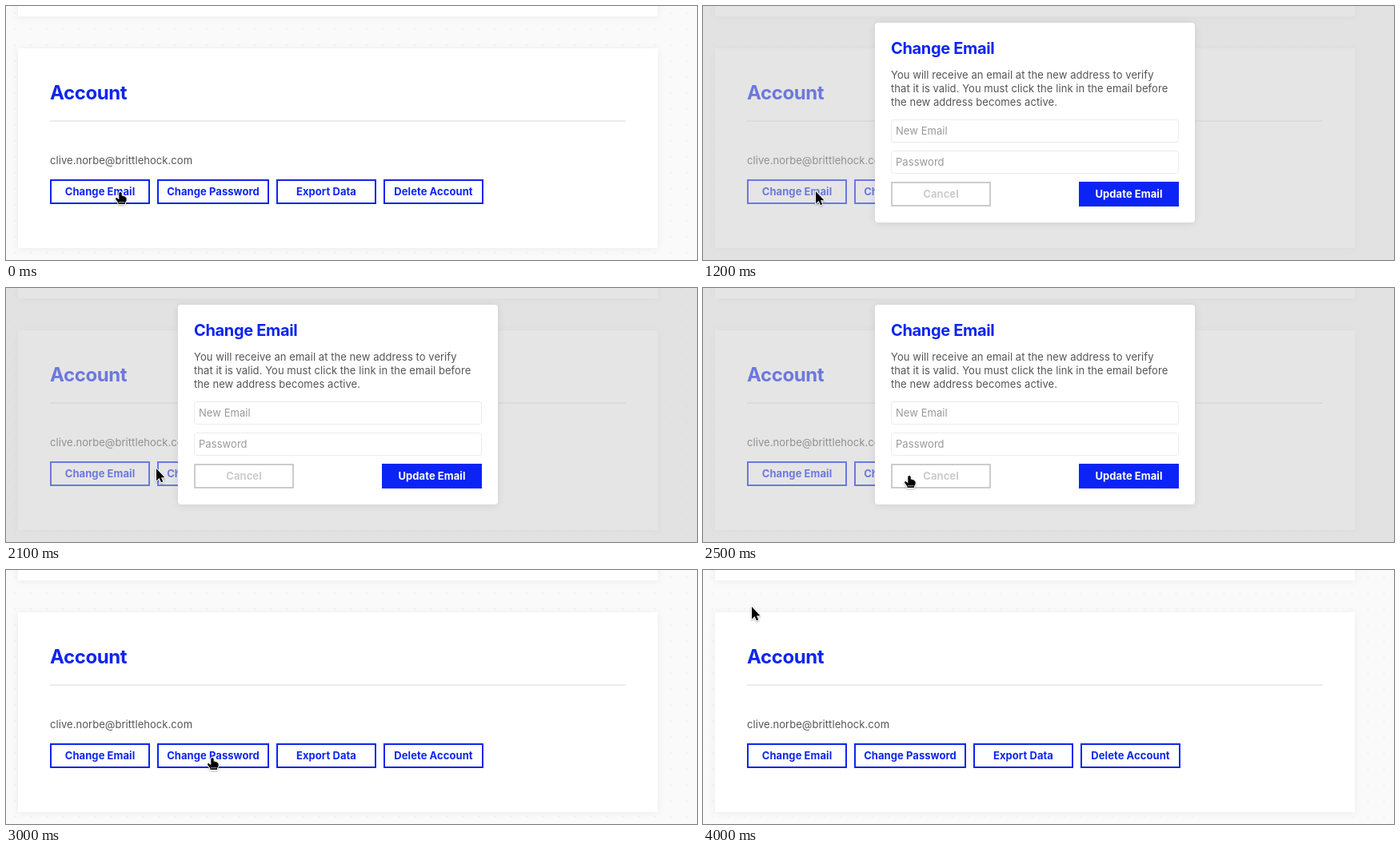
Animation, 864 px wide and 318 px high, one loop 4.1 s. Source, as an HTML page:

```html
<!DOCTYPE html>
<html lang="en">
<head>
<meta charset="utf-8">
<title>Account settings</title>
<style>
  html, body { margin: 0; width: 100%; height: 100%; overflow: hidden; background: #fafafa; }
  svg { display: block; width: 864px; height: 318px; }
  text { font: 400 13px Inter, "Liberation Sans", sans-serif; font-optical-sizing: none; letter-spacing: .06px; fill: #555; }
  .bold { font-weight: 700; text-anchor: middle; }
  .blue { fill: #0d25f0; }
  .title { font-weight: 700; }
  .h1 { font-size: 24px; letter-spacing: -.4px; }
  .h2 { font-size: 20px; letter-spacing: -.34px; }
  .hint { fill: #999; }
  .card { fill: #fff; filter: drop-shadow(0 1px 5px rgba(0, 0, 0, .06)); }
  .box { fill: #fff; filter: drop-shadow(0 1px 5px rgba(0, 0, 0, .09)); }
  .field { fill: #fff; stroke: #ebebeb; }
  .cursor { filter: drop-shadow(0 1px 1px rgba(0, 0, 0, .3)); }
  .cursor path { fill: #000; stroke: #fff; stroke-width: 2; stroke-linejoin: round; paint-order: stroke; }
  .cursor .cuff { fill: none; stroke-width: .7; }
  #modal { visibility: hidden; }
</style>
</head>
<body>
<svg viewBox="0 0 864 318">
  <defs>
    <pattern id="dots" width="20" height="20" patternUnits="userSpaceOnUse">
      <circle cx="11.5" cy="9" r="1" fill="#f0f0f0"/>
    </pattern>
  </defs>
  <rect width="864" height="318" fill="#fafafa"/>
  <rect width="864" height="318" fill="url(#dots)"/>
  <rect class="card" x="15" y="-40" width="800" height="53"/>
  <rect class="card" x="15" y="53" width="800" height="250"/>
  <text class="title blue h1" x="55" y="117">Account</text>
  <rect x="55" y="143" width="720" height="2" fill="#ececec"/>
  <text x="55" y="198">clive.norbe@brittlehock.com</text>
  <g id="buttons"></g>

  <g id="modal">
    <rect width="864" height="318" fill="#ccc" fill-opacity=".5"/>
    <rect class="box" x="215" y="21" width="400" height="250" rx="4"/>
    <text class="title blue h2" x="235" y="60">Change Email</text>
    <text x="235" y="91">You will receive an email at the new address to verify</text>
    <text x="235" y="108">that it is valid. You must click the link in the email before</text>
    <text x="235" y="125">the new address becomes active.</text>
    <rect class="field" x="235.5" y="142.5" width="359" height="28" rx="3"/>
    <text class="hint" x="241" y="161">New Email</text>
    <rect class="field" x="235.5" y="181.5" width="359" height="28" rx="3"/>
    <text class="hint" x="241" y="200">Password</text>
    <g id="actions"></g>
  </g>

  <g id="arrow" class="cursor">
    <path d="M0 0V15.4L3.6 12.1L6 17.3L8.3 16.3L6 11.2H10.4Z"/>
  </g>
  <g id="hand" class="cursor">
    <path d="M-1.7 1.6Q-1.7 0 0 0T1.7 1.6V4.7Q3.6 4 4.2 5.4Q6 5 6.4 6.4Q7.6 6.4 7.6 8V10.4L6 13.2V15H-2.6V13.2L-6 8.8Q-6.4 7-4.6 7L-1.7 9.2Z"/>
    <path class="cuff" d="M-2 12.8H5.4"/>
  </g>
</svg>
<script>
  const LOOP = 4100;
  const BLUE = '#0d25f0';
  const get = id => document.getElementById(id);

  function button(parent, label, x, y, w, line, fill, ink) {
    const NS = 'http://www.w3.org/2000/svg';
    const add = (tag, attrs) => {
      const el = document.createElementNS(NS, tag);
      for (const k in attrs) el.setAttribute(k, attrs[k]);
      return parent.appendChild(el);
    };
    add('rect', { x: x + 1, y: y + 1, width: w - 2, height: 29, fill, stroke: line, 'stroke-width': 2 });
    const text = add('text', { class: 'bold', x: x + w / 2, y: y + 20 });
    text.style.fill = ink;
    text.textContent = label;
  }

  [['Change Email', 55, 125], ['Change Password', 189, 140],
   ['Export Data', 338, 125], ['Delete Account', 472, 125]]
    .forEach(([label, x, w]) => button(get('buttons'), label, x, 217, w, BLUE, '#fff', BLUE));
  button(get('actions'), 'Cancel', 235, 220, 125, '#ccc', '#fff', '#ccc');
  button(get('actions'), 'Update Email', 470, 220, 125, '#0b24f5', '#0b24f5', '#fff');

  // Each row holds its style until the next row's time.
  function hold(el, rows) {
    const keys = rows.map(([t, style]) => ({ ...style, offset: t / LOOP, easing: 'steps(1, end)' }));
    keys.push({ ...rows[rows.length - 1][1], offset: 1 });
    el.animate(keys, { duration: LOOP, iterations: Infinity });
  }

  const show = on => ({ visibility: on ? 'visible' : 'hidden' });

  // time, pointer, x, y
  const moves = [
    [0, 'hand', 143, 233],
    [1100, 'arrow', 141, 232],
    [2100, 'arrow', 188, 226],
    [2200, 'arrow', 226, 225],
    [2300, 'hand', 250, 230],
    [2400, 'hand', 256, 233],
    [2500, 'hand', 258, 235],
    [3200, 'hand', 252, 235],
    [3300, 'hand', 215, 232],
    [3400, 'hand', 166, 230],
    [3500, 'hand', 146, 230],
    [3600, 'hand', 149, 231],
    [3800, 'arrow', 112, 150],
    [3900, 'arrow', 57, 62],
    [4000, 'arrow', 61, 46]
  ];

  for (const id of ['arrow', 'hand'])
    hold(get(id), moves.map(([t, kind, x, y]) =>
      [t, { transform: `translate(${x}px, ${y}px)`, ...show(kind === id) }]));

  hold(get('modal'), [[0, show(false)], [1200, show(true)], [3000, show(false)]]);
</script>
</body>
</html>
```
